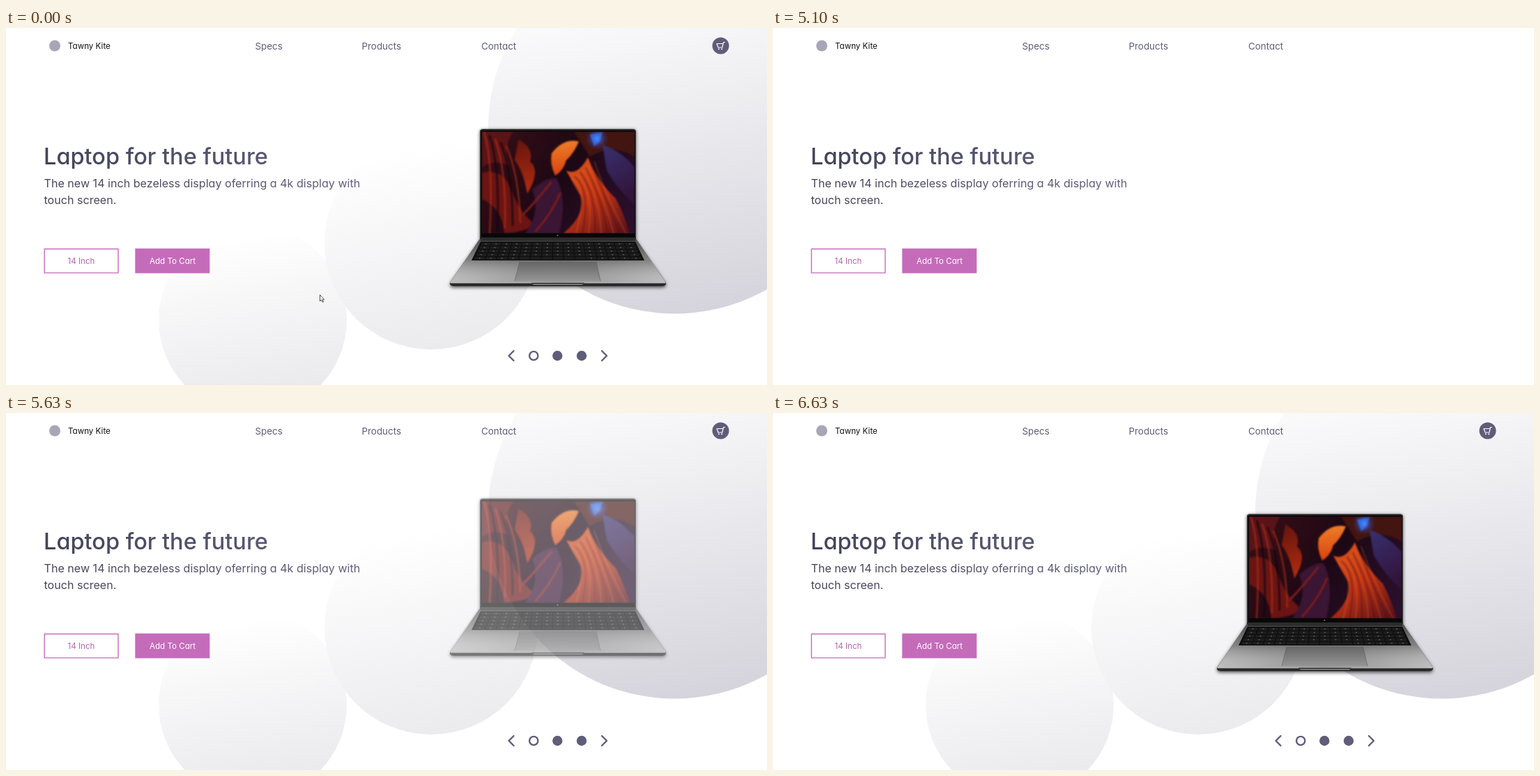
An HTML page with a canvas for the animation above (8 s loop, 1092 px wide and 513 px high).

```html
<!DOCTYPE html>
<html lang="en">
<head>
<meta charset="utf-8">
<title>Laptop landing page</title>
<style>
  html, body { margin: 0; width: 100%; height: 100%; overflow: hidden; background: #fff; }
  canvas, svg { position: absolute; left: 0; top: 0; width: 1092px; height: 513px; }
  text { font-family: Inter, Lato, sans-serif; font-feature-settings: "cv11"; }
  .nav { font-size: 13.4px; fill: #5f5d7a; }
  .button { font-size: 11.6px; }
</style>
</head>
<body>
<canvas id="stage" width="1092" height="513"></canvas>
<svg viewBox="0 0 1092 513">
  <linearGradient id="ink" gradientUnits="userSpaceOnUse" x1="55" x2="520" y1="0" y2="0">
    <stop stop-color="#454359"/><stop offset="1" stop-color="#63617f"/>
  </linearGradient>
  <text x="89" y="30" font-size="11.6" fill="#111">Tawny Kite</text>
  <g class="nav">
    <text x="357.5" y="30.5">Specs</text>
    <text x="510.5" y="30.5">Products</text>
    <text x="682" y="30.5">Contact</text>
  </g>
  <g fill="url(#ink)">
    <text x="54" y="196" font-size="32.5" font-weight="500">Laptop for the future</text>
    <text x="54.5" y="229" font-size="16.1">The new 14 inch bezeless display oferring a 4k display with</text>
    <text x="54.5" y="253" font-size="16.1">touch screen.</text>
  </g>
  <g class="button" text-anchor="middle">
    <text x="108" y="339" fill="#b565b0">14 Inch</text>
    <text x="239" y="339" fill="#fff">Add To Cart</text>
  </g>
  <path id="cursor" d="M.5 .5V9.5L2.6 7.6L4.2 11L5.6 10.4L4.1 7.2H6.7Z" fill="#fff" stroke="#222" stroke-width=".8"/>
</svg>
<script>
const LOOP = 8000, RELOAD = 5100, LOADED = 5230, DROP_TIME = 1500, DROP = 57.5;
const FRAME = 1000 / 15;
const INK = '#5f5d7a', PINK = '#c46cba';
const CURSOR_STOPS = [
  [0, 450, 383], [500, 85, 64], [770, 75, 41], [1370, 77, 36],
  [1430, 75, 27], [1500, 71, 17], [1570, 67, 8]
];
const CURSOR_GONE = 1630;

const canvas = document.getElementById('stage');
const cursor = document.getElementById('cursor');
const page = canvas.getContext('2d');

function fill(c, color, path) {
  c.fillStyle = color;
  c.fill(new Path2D(path));
}

function line(c, color, width, path) {
  c.strokeStyle = color;
  c.lineWidth = width;
  c.stroke(new Path2D(path));
}

function disc(c, x, y, r, color) {
  c.fillStyle = color;
  c.beginPath();
  c.arc(x, y, r, 0, 7);
  c.fill();
}

function ramp(c, x1, y1, x2, y2, ...colors) {
  const g = c.createLinearGradient(x1, y1, x2, y2);
  colors.forEach((color, i) => g.addColorStop(i / (colors.length - 1), color));
  return g;
}

function layer(draw) {
  const el = document.createElement('canvas');
  el.width = canvas.width;
  el.height = canvas.height;
  const c = el.getContext('2d');
  c.lineCap = c.lineJoin = 'round';
  draw(c);
  return el;
}

function bubble(c, x, y, r, shade) {
  const dx = r * 0.18, dy = r * 0.98;
  disc(c, x, y, r, ramp(c, x - dx * 0.9, y - dy * 0.9, x + dx, y + dy, '#fff', shade));
}

function drawDecor(c) {
  bubble(c, 354, 419.5, 135, '#e8e7ea');
  bubble(c, 610, 309, 153, '#ebeaed');
  bubble(c, 959.5, 143, 267.5, '#d5d4dc');

  disc(c, 1025.5, 25.5, 12, INK);
  line(c, '#fff', 1.2, 'M1031.5 20.5H1029.5L1027.8 28H1022L1020 22.5H1028.6');
  disc(c, 1022.8, 30.3, 1, '#fff');
  disc(c, 1027.2, 30.3, 1, '#fff');

  line(c, INK, 2.4, 'M728.5 464L721.5 471L728.5 478M855 464L862 471L855 478');
  c.beginPath();
  c.arc(757.2, 471, 6.1, 0, 7);
  c.stroke();
  disc(c, 791.3, 471, 7.2, INK);
  disc(c, 826, 471, 7.2, INK);
}

function drawControls(c) {
  disc(c, 70, 25.5, 8, '#a8a6b6');
  c.fillStyle = '#fff';
  c.strokeStyle = PINK;
  c.lineWidth = 1.4;
  c.fillRect(55, 317, 106, 35);
  c.strokeRect(55.2, 317.5, 105.8, 34.4);
  c.fillStyle = PINK;
  c.fillRect(185.3, 316.8, 107, 35.6);
}

function drawWallpaper(c) {
  c.save();
  c.beginPath();
  c.rect(683, 149, 219, 146);
  c.clip();
  c.fillStyle = ramp(c, 683, 149, 902, 295, '#3a0e16', '#1c0814', '#2c1030');
  c.fillRect(683, 149, 219, 146);
  c.filter = 'blur(1px)';

  // Left ridges
  fill(c, '#5a1418', 'M683 149H728Q712 172 722 198Q700 188 683 200Z');
  fill(c, ramp(c, 735, 150, 755, 235, '#5c120e', '#b02c10'),
    'M735 160Q758 172 752 192Q768 205 748 238Q742 205 730 190Z');
  fill(c, '#6a1514', 'M683 208Q714 200 726 235Q738 268 762 284Q735 295 715 295Q712 258 683 246Z');
  for (let i = 0; i < 5; i++) {
    line(c, i % 2 ? 'rgba(20,5,14,.8)' : 'rgba(190,50,20,.6)', 2.5,
      `M${686 + i * 8} ${150 + i * 5}Q${700 + i * 9} ${195 + i * 4} ${694 + i * 11} ${295 - i * 4}`);
  }

  // Middle hollow
  fill(c, '#3a1534', 'M755 232Q775 214 790 216Q806 245 794 295H745Q768 265 755 232Z');
  line(c, '#7c1d1c', 3, 'M782 222Q760 250 740 270M795 238Q782 268 760 292');

  // Right wall
  fill(c, '#431510', 'M815 149H902V185Q870 165 838 185Z');
  fill(c, ramp(c, 855, 170, 900, 240, '#38306f', '#321339'), 'M856 168Q882 176 902 200V255Q878 232 862 205Z');

  // Lit rock
  fill(c, ramp(c, 805, 190, 885, 295, '#e0581c', '#bd3315', '#5c1118'),
    'M804 205Q820 213 835 186Q848 220 875 245Q888 270 895 295H800Q832 268 825 242Q815 225 804 205Z');
  fill(c, ramp(c, 790, 160, 795, 212, '#f0812a', '#d8430f'),
    'M783 180Q800 158 822 163Q815 180 804 190Q800 205 788 212Q780 195 783 180Z');
  for (let i = 0; i < 9; i++) {
    line(c, i % 2 ? 'rgba(70,10,20,.55)' : 'rgba(255,120,50,.35)', 1.4,
      `M${812 + i * 4} ${216 - i * 3}Q${836 + i * 4} ${232 + i * 3} ${818 + i * 9} 295`);
  }

  fill(c, '#2f6ae0', 'M838 153L856 150L852 163L844 170Z');
  c.filter = 'none';
  const glow = c.createRadialGradient(848, 159, 1, 848, 159, 17);
  glow.addColorStop(0, 'rgba(70,140,255,.8)');
  glow.addColorStop(1, 'rgba(50,40,160,0)');
  c.fillStyle = glow;
  c.fillRect(825, 149, 50, 40);
  c.restore();
}

function drawKeyboard(c) {
  fill(c, '#0d0d0d', 'M681 307H903L916 334H668Z');
  const rows = 5, cols = 15;
  for (let r = 0; r < rows; r++) {
    const y = 308.5 + r * 5.1;
    const left = 681.5 - r * 2.4, step = (902.5 + r * 2.4 - left) / cols;
    for (let k = 0; k < cols; k++) {
      const x = left + k * step;
      c.fillStyle = '#1d1d1d';
      c.fillRect(x + 0.6, y, step - 1.2, 4);
      const isSpace = r === rows - 1 && k > 3 && k < 10;
      c.fillStyle = 'rgba(190,190,190,.4)';
      if (!isSpace) c.fillRect(x + step * 0.42, y + 1.2, 2, 1.3);
    }
  }
}

function drawLaptop(c) {
  const deck = 'M680 303H904L947 366H637Z';
  c.shadowColor = 'rgba(0,0,0,.65)';
  c.shadowBlur = 5;
  c.shadowOffsetY = 2;
  fill(c, '#2b2b2b', 'M637 366L680 303H904L947 366V368Q946 371 941 371H643Q638 371 637 368Z');
  c.shadowOffsetY = 1;
  fill(c, '#161616', 'M680 304V149Q680 145.3 684 145.3H900Q904 145.3 904 149V304Z');
  c.shadowColor = 'transparent';

  line(c, '#555', 0.7, 'M680.6 301V149Q681 146 684 146H900Q903.4 146 903.4 149V301');
  fill(c, '#080808', 'M682 147.5H902.5V301H682Z');
  drawWallpaper(c);
  disc(c, 791.5, 298, 1, '#777');

  fill(c, ramp(c, 637, 0, 947, 0, '#b8b8b8', '#a0a0a0', '#8c8c8c', '#a0a0a0', '#b8b8b8'), deck);
  fill(c, ramp(c, 0, 303, 0, 366, 'rgba(30,30,30,.65)', 'rgba(50,50,50,.35)', 'rgba(255,255,255,.08)'), deck);
  fill(c, '#2c2c2c', 'M681 301H903V306H681Z');
  drawKeyboard(c);
  fill(c, ramp(c, 0, 336, 0, 363, '#666', '#949494'), 'M737 336H847L853 363.5H730Z');
  line(c, '#5c5c5c', 0.6, 'M737 336L730 363.5M847 336L853 363.5');
  line(c, '#c8c8c8', 0.9, 'M638 366.3H946');
  fill(c, '#444', 'M754 366H830Q829 369.5 824 369.5H760Q755 369.5 754 366Z');
  line(c, '#aaa', 0.8, 'M757 368.5H827');
}

// Standard CSS "ease": cubic-bezier(.25, .1, .25, 1)
function ease(x) {
  if (x <= 0) return 0;
  if (x >= 1) return 1;
  const curve = (a, b, s) => 3 * a * s * (1 - s) ** 2 + 3 * b * s * s * (1 - s) + s ** 3;
  let lo = 0, hi = 1;
  for (let i = 0; i < 24; i++) {
    const mid = (lo + hi) / 2;
    if (curve(0.25, 0.25, mid) < x) lo = mid; else hi = mid;
  }
  return curve(0.1, 1, lo);
}

const decor = layer(drawDecor);
const controls = layer(drawControls);
const laptop = layer(drawLaptop);

function laptopProgress(t) {
  if (t < RELOAD) return 1;
  const elapsed = Math.floor((t - RELOAD + 4) / FRAME) * FRAME;
  return ease(elapsed / DROP_TIME);
}

function placeCursor(t) {
  const [, x, y] = CURSOR_STOPS.filter(stop => stop[0] <= t).pop();
  cursor.setAttribute('transform', `translate(${x} ${y})`);
  cursor.setAttribute('visibility', t < CURSOR_GONE ? 'visible' : 'hidden');
}

function render(t) {
  page.clearRect(0, 0, canvas.width, canvas.height);
  const loading = t >= RELOAD && t < LOADED;
  if (!loading) page.drawImage(decor, 0, 0);
  page.drawImage(controls, 0, 0);
  if (!loading) {
    const p = laptopProgress(t);
    page.globalAlpha = p;
    page.drawImage(laptop, 0, -DROP * (1 - p));
    page.globalAlpha = 1;
  }
  placeCursor(t);
}

const start = performance.now();
function tick() {
  render(Math.max(0, performance.now() - start) % LOOP);
  requestAnimationFrame(tick);
}
tick();
</script>
</body>
</html>
```
